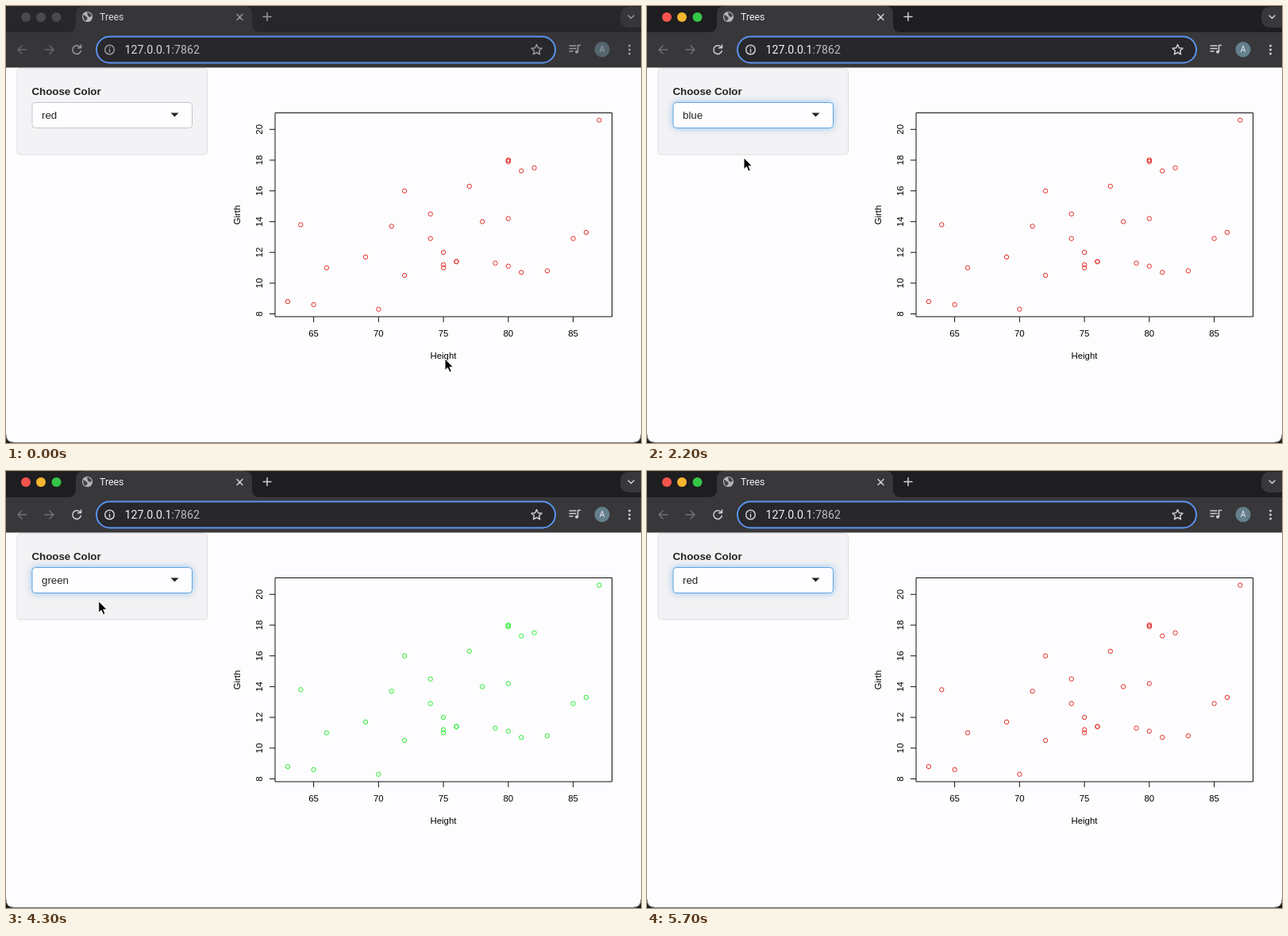
Recreate the animation shown at these times as an HTML page. Size 800 by 550 pixels, loop 6 s.

```html
<!DOCTYPE html>
<html lang="en">
<head>
<meta charset="utf-8">
<title>Choose Color</title>
<style>
  html, body { margin: 0; width: 100%; height: 100%; overflow: hidden; background: #1d1c1f; }
  svg { display: block; --strip: #1e1d20; --bar: #38373a; --icon: #cfced2; --dim: #706f73; --text: #f1f0f3; }
  svg.idle { --strip: #272629; --bar: #363538; --icon: #99989c; --dim: #66656a; --text: #dddce0; }
  .idle .light { fill: #4a494d; }
  .idle .avatar { opacity: .65; }
  .line { fill: none; stroke: var(--icon); stroke-width: 1.5; stroke-linecap: round; stroke-linejoin: round; }
  .dim { stroke: var(--dim); }
  .ui { font-family: Roboto, sans-serif; fill: var(--text); }
  .form { font: 13.3px "Liberation Sans", Arial, sans-serif; fill: #242326; }
  .plot { font: 11.4px "Liberation Sans", Arial, sans-serif; text-anchor: middle; }
  .axes { fill: none; stroke: #111; }
  .points { fill: none; stroke-width: 1; }
  .box { fill: #fefdff; stroke: #c6c5c8; }
  .focus .box { stroke: #62a6e2; filter: drop-shadow(0 0 4px rgba(90, 170, 235, .65)); }
  .menu { fill: #fefdff; stroke: #cfced1; filter: drop-shadow(0 6px 6px rgba(0, 0, 0, .2)); }
</style>
</head>
<body>
<svg id="stage" width="800" height="550" viewBox="0 0 800 550">
  <!-- browser window -->
  <rect width="800" height="78" style="fill:var(--strip)"/>
  <path d="M0 33H78Q88 33 88 23V10Q88 0 98 0H300Q310 0 310 10V23Q310 33 320 33H800V78H0Z" style="fill:var(--bar)"/>
  <path d="M0 77.5H800V539Q800 549 790 549H10Q0 549 0 539Z" fill="#fdfcfe"/>
  <path d="M0 539Q0 549.5 10 549.5H790Q800 549.5 800 539" fill="none" stroke="#77767a"/>
  <circle class="light" cx="25" cy="14" r="6" fill="#f4544d"/>
  <circle class="light" cx="44" cy="14" r="6" fill="#f6b52e"/>
  <circle class="light" cx="63.5" cy="14" r="6" fill="#35c649"/>
  <circle cx="102.5" cy="13.5" r="6.6" fill="#b5b4b9"/>
  <path d="M97 11Q100 12 102 14T100 19Q97 17 97 11M102 8Q107 8 108 13Q104 15 103 12Z" fill="#454448"/>
  <text class="ui" x="118" y="17.7" font-size="12.3">Trees</text>
  <path class="line" d="M291 10.5L298 17.5M298 10.5L291 17.5M324 13.5H334M329 8.5V18.5"/>
  <rect x="774" y="1" width="34" height="26" rx="10" style="fill:var(--bar)"/>
  <path class="line" d="M784 12L787.5 15.5L791 12"/>

  <!-- toolbar -->
  <path class="line dim" d="M26 55H15M20 50L15 55L20 60M49 55H60M55 50L60 55L55 60"/>
  <path class="line" d="M93.5 52A5.3 5.3 0 1 0 94.3 56.5M94.5 49V52.8H90.5"/>
  <rect x="114" y="38.5" width="578" height="33" rx="16.5" fill="#28272b" stroke="#5a93f0" stroke-width="2"/>
  <circle class="line" cx="130.5" cy="55" r="5.8"/>
  <path class="line" d="M130.5 54.5V58M130.5 52V52.1"/>
  <text class="ui" x="149.5" y="60" font-size="14.2">127.0.0.1<tspan fill="#bdbcc0">:7862</tspan></text>
  <path class="line" d="M668.5 48.5L670.4 52.7L675 53.2L671.6 56.3L672.6 60.8L668.5 58.5L664.4 60.8L665.4 56.3L662 53.2L666.6 52.7Z"/>
  <path class="line" d="M710 50H718M710 53.5H718M710 57H714M720.5 57.5V49.5H723.5"/>
  <circle cx="719" cy="57.8" r="2" style="fill:var(--icon)"/>
  <g class="avatar">
    <circle cx="751" cy="54.7" r="9.6" fill="#64808c"/>
    <text class="ui" x="751" y="58.3" font-size="10" text-anchor="middle">A</text>
  </g>
  <path class="line" d="M785.5 50V50.1M785.5 55V55.1M785.5 60V60.1" style="stroke-width:3"/>

  <!-- scatter plot -->
  <g class="plot">
    <path id="axes" class="axes"/>
    <g id="ticks"></g>
    <text x="551" y="444">Height</text>
    <text transform="translate(295 263) rotate(-90)">Girth</text>
    <g id="points" class="points"></g>
  </g>

  <!-- color picker -->
  <g id="picker" class="form">
    <rect x="14" y="78.5" width="239.5" height="108.5" rx="4" fill="#f3f2f4" stroke="#dfdee1"/>
    <text x="32.5" y="111.5" font-weight="bold">Choose Color</text>
    <rect class="box" x="33" y="121.5" width="201.5" height="32" rx="4"/>
    <text id="value" x="45" y="142"></text>
    <path id="caret" stroke="#222" d="M0 130V145"/>
    <path id="toggle"/>
    <g id="menu">
      <rect class="menu" x="33.5" y="156" width="200.5" height="85" rx="3"/>
      <g id="rows"></g>
    </g>
  </g>

  <!-- pointer shapes, hot spot at 0,0 -->
  <g id="pointer">
    <path id="arrow" d="M0 0V14.5L3.4 11.4L5.8 16.8L8.3 15.7L6 10.4H10.4Z" fill="#000" stroke="#fff"/>
    <path id="hand" d="M-2 1Q-1.6-1 0-.6Q1.2-.2 1.5 1.5L2.5 6Q4 4.4 5.2 6Q6.8 4.8 7.8 6.6Q10 6 10.3 8.5Q10.8 12 9 15.5H1.5Q-1 12.6-4 9.5Q-5 8-3.4 7.4Q-2 7.4-.3 9Z M3 9.5V13M5.5 9.5V13M8 9.5V13" fill="#fff" stroke="#111" stroke-width="1.1" stroke-linejoin="round"/>
    <path id="ibeam" d="M-3-7Q0-7 0-5Q0-7 3-7M0-5V5M-3 7Q0 7 0 5Q0 7 3 7M-1.5 1.5H1.5" fill="none" stroke="#111" stroke-width="1.2"/>
  </g>
</svg>
<script>
const $ = id => document.getElementById(id);
const show = (id, on) => $(id).style.display = on ? '' : 'none';

const girth = [8.3, 8.6, 8.8, 10.5, 10.7, 10.8, 11, 11, 11.1, 11.2, 11.3, 11.4, 11.4, 11.7, 12, 12.9,
  12.9, 13.3, 13.7, 13.8, 14, 14.2, 14.5, 16, 16.3, 17.3, 17.5, 17.9, 18, 18, 20.6];
const height = [70, 65, 63, 72, 81, 83, 66, 75, 80, 75, 79, 76, 76, 69, 75, 74,
  85, 86, 71, 64, 78, 80, 74, 72, 77, 81, 82, 80, 80, 80, 87];
const plotX = h => 387.6 + (h - 65) * 16.35;
const plotY = g => 387.5 - (g - 8) * 19.35;

let axes = 'M339 134.5H763.5V391H339Z', labels = '';
for (let h = 65; h <= 85; h += 5) {
  axes += `M${plotX(h)} 391V398`;
  labels += `<text x="${plotX(h)}" y="416">${h}</text>`;
}
for (let g = 8; g <= 20; g += 2) {
  axes += `M339 ${plotY(g)}H332`;
  labels += `<text transform="translate(323 ${plotY(g)}) rotate(-90)">${g}</text>`;
}
$('axes').setAttribute('d', axes);
$('ticks').innerHTML = labels;
$('points').innerHTML = girth.map((g, i) =>
  `<circle cx="${plotX(height[i])}" cy="${plotY(g)}" r="2.7"/>`).join('');

const names = ['red', 'blue', 'green'];
const inks = { red: '#e52d29', blue: '#2026de', green: '#29ee31' };
$('rows').innerHTML = names.map((name, i) =>
  `<rect x="34" y="${161 + 25 * i}" width="199.5" height="25"/>
   <text x="45" y="${178.5 + 25 * i}">${name}</text>`).join('');
const rows = [...$('rows').querySelectorAll('rect')];
const rowTexts = [...$('rows').querySelectorAll('text')];

// Each visit to the menu: opening time, closing time, chosen color
const visits = [[1000, 2100, 'blue'], [3200, 4000, 'green'], [4700, 5300, 'red']];
const focusTime = 200, plotDelay = 200;
const chosenAt = t => visits.reduce((color, [, end, next]) => t >= end ? next : color, 'red');

const stops = [[0, 553, 444], [800, 132, 146], [1400, 132, 146], [1900, 122, 191], [2300, 122, 191],
  [2900, 118, 134], [3200, 118, 134], [3600, 118, 219], [4000, 118, 219], [4500, 116, 134],
  [4900, 116, 134], [5200, 114, 174], [5300, 114, 174], [5700, -30, 260], [6000, -30, 260]];

function pointerAt(t) {
  const i = stops.findIndex(stop => stop[0] > t);
  const [t0, x0, y0] = stops[i - 1], [t1, x1, y1] = stops[i];
  const u = (t - t0) / (t1 - t0), ease = u * u * (3 - 2 * u);
  return [x0 + (x1 - x0) * ease, y0 + (y1 - y0) * ease];
}

function draw(t) {
  const open = visits.some(([start, end]) => t >= start && t < end);
  const chosen = chosenAt(t);
  const [x, y] = pointerAt(t);
  const inside = x > 33 && x < 234;
  const overBox = inside && y > 121 && y < 154;
  const hovered = open && inside && y >= 161 ? Math.floor((y - 161) / 25) : -1;

  $('stage').classList.toggle('idle', t < focusTime);
  $('picker').classList.toggle('focus', t >= visits[0][0]);
  $('points').style.stroke = inks[chosenAt(t - plotDelay)];

  $('value').textContent = chosen;
  $('toggle').setAttribute('d', open ? 'M207.5 138.5H217.5L212.5 133.5Z' : 'M207.5 134.5H217.5L212.5 139.5Z');
  $('caret').setAttribute('transform', `translate(${45.5 + $('value').getComputedTextLength()} 0)`);
  show('caret', open && t % 1000 < 700);
  show('menu', open);
  rows.forEach((row, i) => {
    const active = names[i] === chosen;
    row.style.fill = active ? '#2969aa' : i === hovered ? '#f1f0f2' : 'none';
    rowTexts[i].style.fill = active ? '#fff' : '';
  });

  const shape = overBox ? (open ? 'ibeam' : 'hand') : hovered >= 0 ? 'hand' : 'arrow';
  for (const id of ['arrow', 'hand', 'ibeam']) show(id, id === shape);
  $('pointer').setAttribute('transform', `translate(${x} ${y})`);
}

const begin = performance.now();
function tick() {
  const t = (performance.now() - begin) % 6000;
  draw(Math.floor(t / 100) * 100);
  requestAnimationFrame(tick);
}
tick();
</script>
</body>
</html>
```
